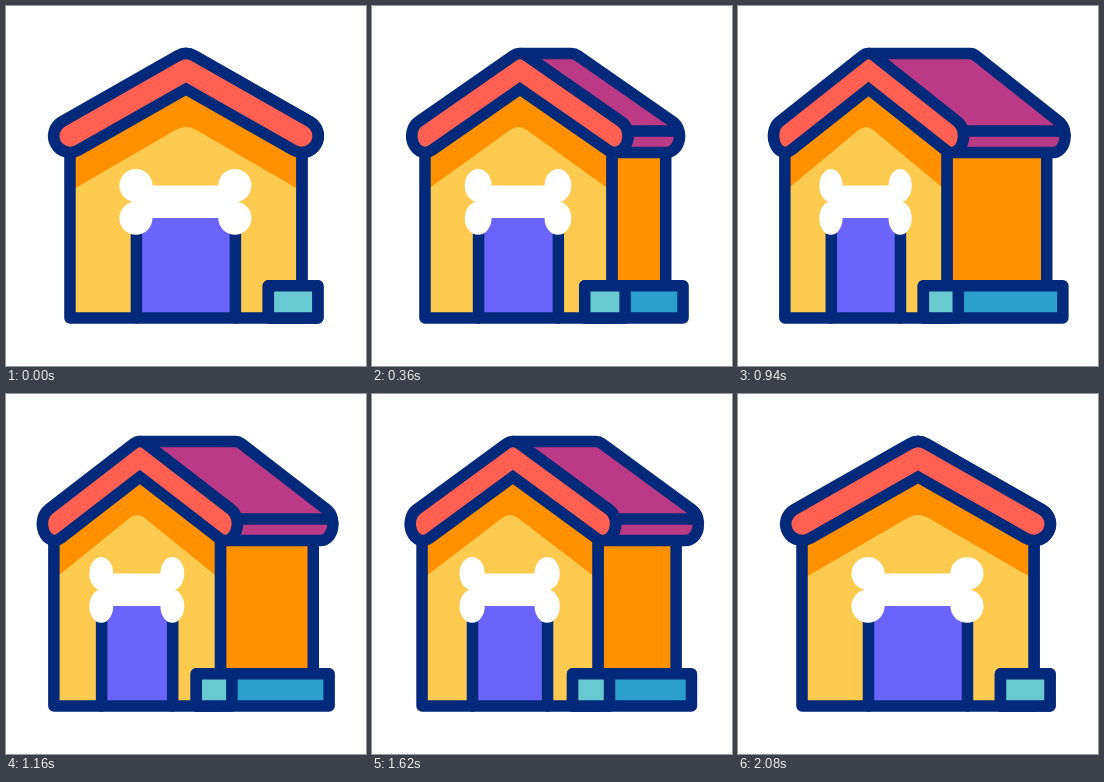
Recreate the animation shown at these times as an HTML page. Size 360 px wide and 360 px high, loop 2.4 s.

```html
<!DOCTYPE html>
<html lang="en">
<head>
<meta charset="utf-8">
<title>Dog house</title>
<style>
  html, body { margin: 0; width: 100%; height: 100%; overflow: hidden; background: #fff; }
  svg { display: block; width: 100%; height: 100%; }
  .line { stroke: #02297a; stroke-width: 11.5; stroke-linecap: round; }
  .round { stroke-linejoin: round; }
  .none { fill: none; }
  .purple { fill: #bb3a86; }
  .red { fill: #ff6052; }
  .orange { fill: #ff9100; }
  .yellow { fill: #fdca50; }
  .violet { fill: #6b64fa; }
  .blue { fill: #2a9fcb; }
  .teal { fill: #68cad0; }
  .white { fill: #fff; }
</style>
</head>
<body>
<svg viewBox="0 0 360 360">
  <path id="sideWall" class="line round orange"/>
  <path id="sideRoof" class="line round purple"/>
  <path id="fascia" class="line none"/>
  <path id="gable" class="orange"/>
  <path id="wall" class="yellow"/>
  <path id="door" class="line violet"/>
  <path id="frame" class="line round none"/>
  <path id="bone" class="white"/>
  <path id="roof" class="line red"/>
  <path id="bowlSide" class="line round blue"/>
  <path id="bowl" class="line round teal"/>
</svg>
<script>
const LOOP = 2400;
const TIMES = [0, 613, 1640, 2080];

// Each value: facing front, fully turned, end of the slow drift back.
const POSES = {
  wallX: [180, 123, 138.3],
  wallScale: [1, 0.67, 0.76],
  roofX: [180, 125.5, 141.2],
  roofScale: [1, 0.69, 0.778],
  sideEdge: [269, 311, 304],
  roofEdge: [279, 327.5, 326.5],
  bowlLeft: [262.5, 178, 201],
  bowlMid: [312, 212, 238],
  bowlRight: [287.5, 327.5, 319.3]
};

function poseAt(t) {
  let i = 0;
  while (i < 2 && t >= TIMES[i + 1]) i++;
  const k = Math.min(1, (t - TIMES[i]) / (TIMES[i + 1] - TIMES[i]));
  const pose = {};
  for (const [name, v] of Object.entries(POSES)) {
    const from = v[i], to = v[(i + 1) % 3];
    pose[name] = from + (to - from) * k;
  }
  return pose;
}

const set = (id, d) => document.getElementById(id).setAttribute('d', d);
const box = (l, t, r, b) => `M${l},${t}H${r}V${b}H${l}Z`;
const lobe = (x, y, rx, ry) =>
  `M${x - rx},${y}a${rx},${ry} 0 1 1 ${2 * rx},0a${rx},${ry} 0 1 1 ${-2 * rx},0Z`;

function drawFront(p) {
  const x = v => p.wallX + (v - 180) * p.wallScale;
  const left = x(64), right = x(296);
  set('gable', `M${left},130L${x(180)},64L${right},130V312H${left}Z`);
  set('wall', `M${left},185.3L${x(170)},123.8Q${x(180)},118 ${x(190)},123.8` +
    `L${right},185.3V312H${left}Z`);
  set('frame', `M${left},135V312H${right}V135`);
  set('door', `M${x(130.5)},312V205H${x(229.5)}V312`);
  let bone = box(x(130), 179.5, x(229), 212);
  for (const cx of [130, 229])
    for (const cy of [179.5, 212.2]) bone += lobe(x(cx), cy, 16.6 * p.wallScale, 16.6);
  set('bone', bone);
  return right;
}

function drawRoof(p) {
  const s = p.roofScale;
  const x = v => p.roofX + (v - 180) * s;
  const arc = `A${16.5 * s},16.5 0 0 1 `;
  set('roof', `M${x(55.84)},115.66L${x(171.84)},49.66${arc}${x(188.16)},49.66` +
    `L${x(304.16)},115.66${arc}${x(287.84)},144.34L${x(180)},83` +
    `L${x(72.16)},144.34${arc}${x(55.84)},115.66Z`);

  // The side is the right slope pushed back by the depth.
  const depth = Math.max(0, p.roofEdge - x(312.5));
  const back = v => x(v) + depth;
  set('sideRoof', `M${x(180)},47.5H${back(180)}${arc}${back(188.16)},49.66` +
    `L${back(304.16)},115.66${arc}${back(296)},146.5H${x(296)}Z`);
  set('fascia', `M${x(300)},125H${back(311)}`);
}

function draw(t) {
  const p = poseAt(t);
  const right = drawFront(p);
  drawRoof(p);
  set('sideWall', box(right, 140, Math.max(right, p.sideEdge), 279.75));
  set('bowlSide', box(p.bowlLeft, 279.75, Math.max(p.bowlMid, p.bowlRight), 312));
  set('bowl', box(p.bowlLeft, 279.75, p.bowlMid, 312));
}

const start = performance.now();
function tick(now) {
  draw(Math.max(0, now - start) % LOOP);
  requestAnimationFrame(tick);
}
draw(0);
requestAnimationFrame(tick);
</script>
</body>
</html>
```
